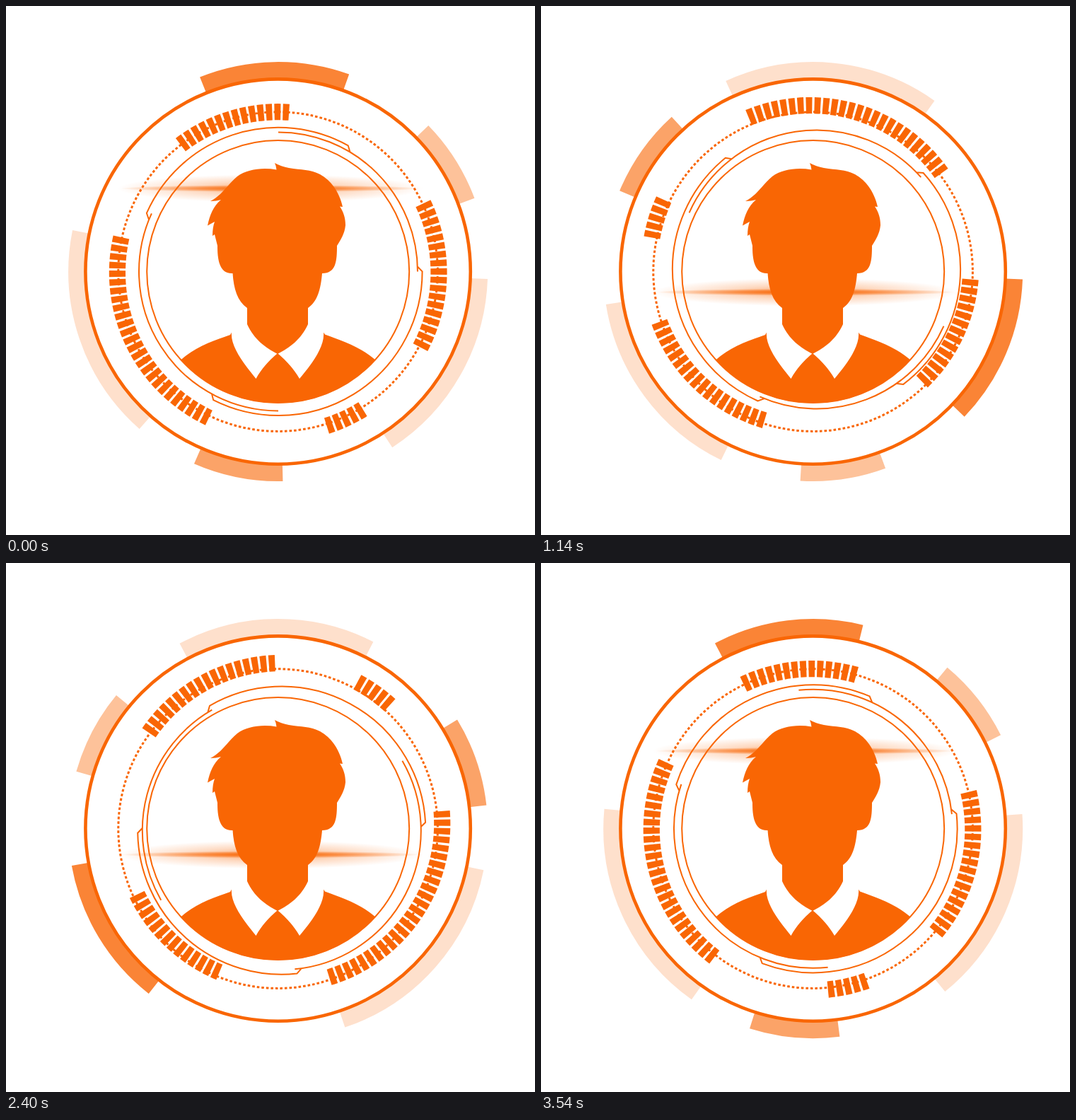
An HTML page that plays this animation: 748 px wide and 748 px high, repeating every 3600 ms.

```html
<!DOCTYPE html>
<html lang="en">
<head>
<meta charset="utf-8">
<title>Face scan</title>
<style>
html, body { margin: 0; width: 100%; height: 100%; overflow: hidden; background: #fff; }
svg { display: block; width: 748px; height: 748px; }
</style>
</head>
<body>
<svg viewBox="0 0 748 748" fill="none" stroke="#f96604">
  <defs>
    <radialGradient id="glow">
      <stop offset="0" stop-color="#f96604" stop-opacity=".6"/>
      <stop offset=".5" stop-color="#f96604" stop-opacity=".24"/>
      <stop offset="1" stop-color="#f96604" stop-opacity="0"/>
    </radialGradient>
    <radialGradient id="core">
      <stop offset="0" stop-color="#f96604"/>
      <stop offset=".5" stop-color="#f96604" stop-opacity=".6"/>
      <stop offset="1" stop-color="#f96604" stop-opacity="0"/>
    </radialGradient>
    <clipPath id="inside"><circle cx="384.7" cy="375.6" r="186"/></clipPath>
  </defs>
  <g id="segments" stroke-width="24.5"></g>
  <circle cx="384.6" cy="375.6" r="272.2" stroke-width="4.6"/>
  <circle cx="384.6" cy="375.6" r="225.8" stroke-width="3" stroke-dasharray="3.6 2.968"/>
  <path id="ticks" stroke-width="23.2"/>
  <path id="circuit" stroke-width="2"/>
  <circle cx="384.7" cy="375.6" r="185.5" stroke-width="2"/>
  <g id="beam" stroke="none">
    <ellipse cx="374" rx="216" ry="20" fill="url(#glow)"/>
    <ellipse cx="374" rx="212" ry="5" fill="url(#core)"/>
  </g>
  <g fill="#f96604" stroke="none" clip-path="url(#inside)">
    <path d="M380 222Q389 227 400 229C418 232 430 231 444 238C462 248 472 266 476 284L472 283.500C477 291 480 299 480 310C479 322 473 331 468 339C468 360 467 378 447 378C445 400 441 417 427 427V450C417 472 401 483 384 492C367 483 351 472 341 450V427C327 417 322 400 320.500 378C301 379 299 357 299 339Q297 331 295 323L292 325Q292 313 295 305L285 310.500C288 296 293 283 304 274Q297 276 289 276C306 267 312 254 327 241C341 231 362 228 382.500 231.500Q382 226 380 222Z"/>
    <path d="M240 508C262 483 292 474 317 465L319 461.500C317 482 338 508 353.500 527C361 513 373 500 384 491C395 500 407 513 415 527C431 508 451 482 449 461.500L451 464.500C476 474 507 483 530 508V570H240Z"/>
  </g>
</svg>
<script>
const $ = id => document.getElementById(id);

// Angles run clockwise in degrees from the top.
const polar = (cx, cy) => {
  const point = (r, a) => {
    const k = a * Math.PI / 180;
    return (cx + r * Math.sin(k)).toFixed(2) + ' ' + (cy - r * Math.cos(k)).toFixed(2);
  };
  const sweep = (r, from, to) => `A${r} ${r} 0 ${+(to - from > 180)} 1 ${point(r, to)}`;
  const arc = (r, from, to) => `M${point(r, from)}${sweep(r, from, to)}`;
  return { point, sweep, arc };
};

// Outer segments: start, end, opacity
const outer = polar(384.7, 375.6);
$('segments').innerHTML = [
  [-21.9, 19.8, .8], [45.8, 69.5, .4], [92, 147, .2], [178.7, 203.6, .6], [221.4, 281.4, .2]
].map(([from, to, alpha]) => `<path d="${outer.arc(284.25, from, to)}" opacity="${alpha}"/>`).join('');

// Tick groups: first tick angle, count
const tickRing = polar(384.7, 377);
let ticks = '';
for (const [first, count] of [[-36.2, 14], [65.6, 18], [149.3, 5], [206.6, 26]])
  for (let i = 0; i < count; i++)
    ticks += tickRing.arc(227.3, first + i * 3 - 1.1, first + i * 3 + 1.1);
$('ticks').setAttribute('d', ticks);

// Thin line that jumps between two radii
const { point, sweep, arc } = polar(385, 375.4);
const low = 197, high = 203.6;
const raised = (a, b, c, d) =>
  `M${point(low, a)}L${point(high, b)}${sweep(high, b, c)}L${point(low, d)}`;
$('circuit').setAttribute('d',
  arc(low, 0, 90) + raised(88, 90, 206.8, 208.5) +
  arc(low, 180, 294.6) + raised(291.8, 293.9, 389, 391));

const LOOP = 3600, STEP = 60;
function draw(now) {
  const p = Math.floor(now % LOOP / STEP) * STEP / LOOP;
  const turn = (id, angle, x, y) => $(id).setAttribute('transform', `rotate(${angle} ${x} ${y})`);
  turn('segments', 360 * p, 384.7, 375.6);
  turn('ticks', -720 * p, 384.7, 371.5);
  turn('circuit', 360 * p, 388.2, 375.4);
  const y = 258 + 231.5 * (1 - Math.abs(1 - 2 * p));
  $('beam').setAttribute('transform', `translate(0 ${y})`);
}

const start = performance.now();
function loop() {
  draw(performance.now() - start);
  requestAnimationFrame(loop);
}
loop();
</script>
</body>
</html>
```
